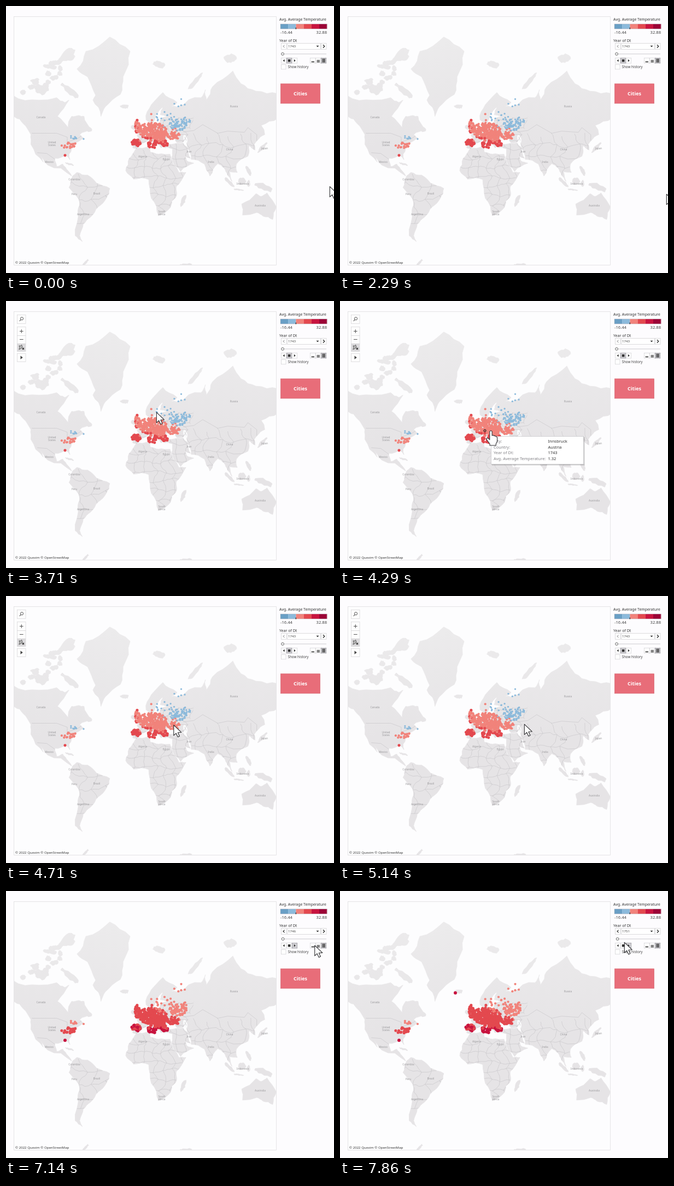
Recreate the animation shown at these times as an HTML page. Size 600 by 490 pixels, loop 8 s.

```html
<!DOCTYPE html>
<html lang="en">
<head>
<meta charset="utf-8">
<title>City temperatures</title>
<style>
html, body { margin: 0; width: 100%; height: 100%; overflow: hidden; background: #fdfcfe; }
svg { display: block; width: 600px; height: 490px; font-family: "Noto Sans", "Open Sans", sans-serif; }
</style>
</head>
<body>
<svg id="stage" viewBox="0 0 600 490" xmlns="http://www.w3.org/2000/svg">
  <defs>
    <clipPath id="mapClip"><rect x="15" y="20" width="479" height="455"/></clipPath>
    <linearGradient id="landFill" gradientUnits="userSpaceOnUse" x1="0" y1="60" x2="0" y2="260">
      <stop offset="0" stop-color="#ecebec"/><stop offset="1" stop-color="#e6e4e6"/>
    </linearGradient>
  </defs>
</svg>
<script>
const stage = document.getElementById('stage');

let seed = 1743;
const random = () => (seed = (seed * 16807) % 2147483647) / 2147483647;
const spread = size => (random() - .5) * size;

function el(tag, attrs = {}, parent = stage, content) {
  const node = document.createElementNS('http://www.w3.org/2000/svg', tag);
  for (const key in attrs) node.setAttribute(key, attrs[key]);
  if (content !== undefined) node.textContent = content;
  parent.appendChild(node);
  return node;
}
const group = (attrs, parent) => el('g', attrs, parent);
const path = (d, fill, parent, extra) => el('path', { d, fill, ...extra }, parent);
const box = (x, y, width, height, fill, stroke, parent, extra) =>
  el('rect', { x, y, width, height, fill, stroke, 'stroke-width': .7, ...extra }, parent);
const label = (x, y, size, content, fill = '#333', parent, extra) =>
  el('text', { x, y, 'font-size': size, fill, ...extra }, parent, content);

// ---- Base map: Mercator key points joined by seeded rough coasts ----
const project = (lon, lat) => [246.5 + 1.62 * lon, 325 - 93 * Math.asinh(Math.tan(lat * Math.PI / 180))];
const parse = text => text.split(', ').map(pair => project(...pair.split(' ').map(Number)));
const toPath = points => 'M' + points.map(p => p.map(v => v.toFixed(1)).join(' ')).join('L');

// Splits every edge and pushes its middle sideways.
function roughen(points, amount, closed, passes = 2) {
  if (!passes) return points;
  const result = [];
  points.forEach((a, i) => {
    result.push(a);
    if (!closed && i === points.length - 1) return;
    const b = points[(i + 1) % points.length], shift = spread(amount);
    result.push([(a[0] + b[0]) / 2 + (b[1] - a[1]) * shift, (a[1] + b[1]) / 2 - (b[0] - a[0]) * shift]);
  });
  return roughen(result, amount, closed, passes - 1);
}

const continents = {
  northAmerica: '-145 70, -115 68, -95 69, -86 67, -81 68, -94 60, -82 53, -78 60, -70 60.5, -64 60, -56 52, -69 48, -64 45, -74 40.5, -81 31, -80 25.5, -84 30, -97 27, -95 18.5, -88 21, -84 15.8, -78 8, -105 20, -114 31, -110 23, -124 40, -124 48, -137 58.5, -145 60.5',
  southAmerica: '-77 8, -72 12, -60 9, -50 0, -35 -6, -39 -17, -48 -26, -57 -36, -65 -42, -69 -51, -66 -55, -74 -51, -71 -30, -70 -18, -81 -5',
  greenland: '-45 60, -54 68, -51 70, -60 76, -72 78, -62 81.5, -35 83.6, -12 81.5, -20 76, -23 70.3, -40 65',
  africa: '-6 35.5, 10 37, 11 33, 20 31, 33 31, 43 12, 51 12, 40 -4, 40 -15, 35 -20, 32 -28, 20 -34.7, 12 -17, 9 4, -8 4.5, -17 14, -13 27',
  europe: '-9 37, -9 43, -1 44, -4 48, 8 54, 10 57, 11 54, 21 55, 23 59, 30 60, 60 60, 48 42, 41 41.5, 38 46, 29 45, 28 41, 23 37, 14 45, 18 40, 11 44, 0 40, -5 36',
  russia: '30 60, 22 61, 25 65, 17 61, 14 56, 6 58, 12 66, 25 71, 41 67, 34 65, 42 65, 68 69, 73 72, 74 68, 81 73, 104 77.5, 113 74, 130 71.5, 155 70.5, 155 59, 136 54.5, 140 48, 131 43, 118 49, 87 48, 48 46',
  asia: '48 48, 70 55, 87 49, 120 52, 133 47, 128 40, 129 35, 122 39, 121 29, 108 21, 109 12, 100 13, 103 2, 98 9, 94 17, 87 21.5, 78 8, 72 21, 57 26, 53 37',
  arabia: '53 37, 56 27, 49 30, 52 24.5, 60 22, 45 13, 35 28, 36 36, 27 37, 28 41, 41 41, 48 41',
  australia: '114 -23, 130 -12, 136 -15, 142.5 -11, 153 -26, 149 -38, 138 -35, 131 -31.5, 115 -34'
};

box(14.5, 19.5, 480, 456, '#fdfdfe', '#dfdee0', stage, { 'stroke-width': .8 });
const map = group({ 'clip-path': 'url(#mapClip)' });
const defs = stage.querySelector('defs');
const drawLand = points => path(toPath(points) + 'Z', 'url(#landFill)', map,
  { stroke: 'url(#landFill)', 'stroke-width': .8, 'stroke-linejoin': 'round' });

for (const name in continents) {
  const outline = roughen(parse(continents[name]), .22, true);
  drawLand(outline);
  path(toPath(outline) + 'Z', '#000', el('clipPath', { id: name }, defs));
}

function island(cx, cy, length, width, tilt = 0) {
  const turn = tilt * Math.PI / 180, points = [];
  for (let i = 0; i < 9; i++) {
    const angle = i * 2 * Math.PI / 9, r = .95 + spread(.4);
    const u = length * r * Math.cos(angle), v = width * r * Math.sin(angle);
    points.push([cx + u * Math.cos(turn) - v * Math.sin(turn), cy + u * Math.sin(turn) + v * Math.cos(turn)]);
  }
  drawLand(roughen(points, .4, true, 1));
}
island(217, 185, 8, 4);            // Iceland
island(241, 218, 10, 4, 75);       // Britain
island(233, 222, 4, 4);
island(324, 357, 11, 4, 110);      // Madagascar
island(470, 259, 14, 3, -50);      // Japan
island(409, 324, 14, 3, 45);       // Indonesia
island(425, 337, 10, 1.5, 8);
island(432, 322, 8, 7, -40);
island(444, 326, 3, 6);
island(471, 333, 18, 5, 20);
island(444, 303, 10, 3, 65);       // Philippines
island(153, 227, 5, 4);            // Newfoundland
island(116, 290, 9, 1.5, 18);      // Cuba
island(279, 107, 11, 7, 15);       // Svalbard
island(347, 138, 20, 4, -50);      // Novaya Zemlya
island(410, 97, 11, 9);
island(145, 471, 9, 2, -45);
island(330, 475, 12, 2);
island(118, 157, 22, 7, 40);       // Baffin
island(65, 153, 14, 9, 10);
island(113, 90, 17, 9, -35);
for (let i = 0; i < 16; i++) {
  island(103 - i * 3.6 + spread(38), 97 + i * 4 + spread(8), 4 + random() * 5, 2.5 + random() * 3, spread(70));
}
el('ellipse', { cx: 328, cy: 244, rx: 3.5, ry: 8, fill: '#fbfbfc', transform: 'rotate(-15 328 244)' }, map);

const borderStyle = { stroke: '#c5c3c6', 'stroke-width': .6, 'stroke-linejoin': 'round' };
const border = (points, clip) => path(toPath(points), 'none', clip, borderStyle);
['-123 49, -95 49, -83 46, -83 42, -71 45, -67 47', '-117 32.5, -106 31.7, -97 26',
 '48 50, 60 51, 70 55, 87 49, 98 50.5, 117 49.7, 121 53, 131 48, 131 43'
].forEach(line => border(parse(line), map));

// Countries as a jittered brick lattice, cut off at the coast.
function countries(name, left, top, right, bottom, cell) {
  const clip = group({ 'clip-path': `url(#${name})` }, map);
  const corner = (row, col) => [left + (col + row % 2 * .5) * cell + spread(cell * .5), top + row * cell + spread(cell * .5)];
  const rows = Math.ceil((bottom - top) / cell), cols = Math.ceil((right - left) / cell);
  let above;
  for (let row = 0; row <= rows; row++) {
    const line = Array.from({ length: cols + 1 }, (_, col) => corner(row, col));
    if (row) border(roughen(line, .3), clip);
    if (above) line.forEach((point, col) => border(roughen([above[col], point], .3), clip));
    above = line;
  }
}
countries('africa', 215, 262, 330, 385, 17);
countries('southAmerica', 112, 304, 195, 395, 24);
countries('asia', 322, 236, 440, 320, 21);
countries('arabia', 290, 244, 345, 310, 17);
countries('europe', 232, 195, 330, 260, 13);

[['Canada', 64, 206], ['United', 84, 252], ['States', 84, 257], ['Mexico', 79, 288], ['Colombia', 125, 320],
 ['Brazil', 166, 346], ['Peru', 125, 347], ['Argentina', 141, 384], ['Algeria', 250, 278], ['Egypt', 293, 283],
 ['South', 285, 379], ['Africa', 285, 384], ['Russia', 417, 186], ['China', 409, 265], ['India', 375, 288],
 ['Iran', 335, 269], ['Japan', 473, 263], ['Indonesia', 433, 328], ['Australia', 465, 368]
].forEach(([name, x, y]) => label(x, y, 4.8, name, '#99989b', map, { 'text-anchor': 'middle' }));
label(17, 472.5, 6.1, '© 2022 Quovim © OpenStreetMap', '#333');

// ---- City marks ----
const palette = ['#6a9fc5', '#8cbadb', '#f1837b', '#e3494f', '#c8143f', '#9b0436'];
const coldest = -16.44, binSize = 8.22;
const cities = [];

function cluster(cx, cy, rx, ry, count, since = 1743) {
  while (count--) {
    const angle = random() * 2 * Math.PI, r = Math.sqrt(random());
    const x = cx + rx * r * Math.cos(angle), y = cy + ry * r * Math.sin(angle);
    const node = el('circle', { cx: x.toFixed(1), cy: y.toFixed(1) }, map);
    cities.push({ x, y, since, noise: spread(3), node });
  }
}
cluster(284, 203, 25, 10, 18);     // Nordic countries
cluster(311, 180, 24, 13, 5);
cluster(315, 218, 16, 11, 75);     // Russia
cluster(331, 211, 9, 7, 14);
cluster(305, 238, 14, 7, 45);      // Ukraine
cluster(240, 222, 5, 13, 32);      // Britain
cluster(268, 229, 26, 15, 270);    // Central Europe
cluster(284, 242, 13, 10, 75);     // Balkans
cluster(238, 251, 8, 6, 34);       // Iberia
cluster(268, 253, 8, 8, 22);       // Italy
cluster(290, 253, 6, 5, 12);
cluster(122, 242, 9, 4, 8);        // Eastern America
cluster(114, 254, 13, 8, 20);
cluster(142, 244, 0, 0, 1);
cluster(108, 274, 0, 0, 1);
cluster(211, 187, 0, 0, 1, 1750);  // Iceland

// Colder to the north and, more strongly in the north, to the east.
function temperature({ x, y, noise }, year) {
  const season = year === 1743 || year === 1745 ? 0 : 6.5;
  if (x < 200) return season + 2 + .34 * (y - 250);
  const south = y - 230, east = x - 265;
  const mean = 5 + .12 * south + .2 * Math.max(0, south - 10) - east * (.1 - .004 * south);
  return season + Math.max(-4.5, mean + noise);
}
let shownYear;
function paintCities(year) {
  if (year === shownYear) return;
  shownYear = year;
  cities.forEach(city => {
    const bin = Math.floor((temperature(city, year) - coldest) / binSize);
    const missing = year < city.since || (year > 1745 && city.x > 330);
    city.node.setAttribute('r', missing ? 0 : 1.2 + bin * .45);
    city.node.setAttribute('fill', palette[bin]);
  });
}

// ---- Side panel ----
label(500, 27, 6.9, 'Avg. Average Temperature', '#333', stage, { 'font-weight': 500 });
palette.forEach((color, i) => box(502 + i * 14.2, 33, 14.3, 9, color, 'none'));
box(502, 33, 85, 9, 'none', '#b9b4ba', stage, { 'stroke-width': .5 });
path('M530.3 39.5V42.5', 'none', stage, { stroke: '#222', 'stroke-width': 1.2 });
label(502, 50.5, 7.6, '-16.44', '#444');
label(587, 50.5, 7.6, '32.88', '#444', stage, { 'text-anchor': 'end' });
label(500, 65.5, 7, 'Year of Dt', '#333', stage, { 'font-weight': 500 });

box(503.5, 68.5, 9.5, 11, '#fff', '#cfced1');
box(514.5, 68.5, 61, 11, '#fff', '#cfced1');
box(576.5, 68.5, 9.5, 11, '#fff', '#cfced1');
const backArrow = path('M509.6 71.6L507 74L509.6 76.4', 'none', stage, { 'stroke-width': 1.1 });
path('M580 71.3L582.8 74L580 76.7', 'none', stage, { stroke: '#222', 'stroke-width': 1.2 });
path('M567.5 72.8H572.5L570 75.6Z', '#333');
const yearText = label(516, 76.4, 6.1, '', '#444');

path('M506 88H586', 'none', stage, { stroke: '#cccbce', 'stroke-width': 1 });
const knob = el('circle', { cy: 88, r: 2.4, fill: '#fff', stroke: '#555', 'stroke-width': .9 });

const buttonRow = left => [0, 1, 2].map(i => box(left + i * 9.9, 95.5, 9.4, 9.5));
const [backButton, stopButton, playButton] = buttonRow(503.5);
const [slowButton, mediumButton, fastButton] = buttonRow(556.6);
path('M509.6 97.8V102.6L506.6 100.2ZM515.8 97.9H520.4V102.5H515.8ZM526.8 97.8V102.6L529.8 100.2Z', '#333');
path('M558.6 102.5H564M568.5 99.8H574M568.5 102.5H574M578.3 97.6H584M578.3 100H584M578.3 102.5H584', 'none', stage,
  { stroke: '#222', 'stroke-width': 1.3 });
function press(node, on) {
  node.setAttribute('fill', on ? '#d3d2d6' : '#fff');
  node.setAttribute('stroke', on ? '#8d8c92' : '#d2d1d4');
}
press(backButton, false);
press(slowButton, false);
press(fastButton, true);
box(503.5, 107.5, 8.5, 8.5, '#fff', '#cfced1');
label(515.5, 114.3, 6.3, 'Show history', '#444');
box(502.5, 142.8, 72, 36, '#e86d79', '#d5626e');
label(538.5, 164.3, 9, 'Cities', '#fff', stage, { 'font-weight': 700, 'text-anchor': 'middle' });

// ---- Map toolbar ----
const toolbar = group();
const tool = (y, height, fill = '#fdfdfd') => box(20.5, y, 15.5, height, fill, '#d4d3d6', toolbar);
tool(25.5, 16);
tool(47.5, 16);
tool(63.5, 15);
tool(78.5, 14, '#dcdbdd');
tool(96.5, 15);
el('circle', { cx: 29, cy: 32.3, r: 2.6, fill: 'none', stroke: '#555', 'stroke-width': 1 }, toolbar);
path('M27 34.3L24.8 36.8M25 55.5H31.6M28.3 52.2V58.8M25 70.5H31.6', 'none', toolbar, { stroke: '#555', 'stroke-width': 1.1 });
path('M24 82L27 82.6L28.5 80.5L30 84L28 87L23.8 89L25 85.5Z', '#bbb', toolbar, { stroke: '#333', 'stroke-width': .7 });
path('M29.8 86L33 89.2M33 86L29.8 89.2', 'none', toolbar, { stroke: '#222', 'stroke-width': 1.1 });
path('M26.5 100.6V107L30.8 103.8Z', '#444', toolbar);

// ---- Tooltip ----
const tooltip = group();
[2, 1].forEach(d => box(276 + d, 248 + d, 170, 52, '#000', 'none', tooltip, { opacity: .1 }));
box(276.5, 248.5, 169, 51, '#fff', '#c4c3c6', tooltip);
[['City:', 'Innsbruck'], ['Country:', 'Austria'], ['Year of Dt:', '1743'], ['Avg. Average Temperature:', '1.32']]
  .forEach(([key, value], i) => {
    const y = 260.3 + i * 10.5;
    label(281, y, 7.5, key, '#818085', tooltip);
    label(380.5, y, 7.5, value, '#333', tooltip, { 'font-weight': 500 });
  });
const hoverRing = el('circle', { cx: 265, cy: 238, r: 2.2, fill: '#c9605c', stroke: '#222', 'stroke-width': 1 });

// ---- Pointer ----
const outline = { stroke: '#2b2b2e', 'stroke-width': 1.1, 'stroke-linejoin': 'round' };
const arrow = path('M.3 .3V19.4L4.7 15.4L7.9 22.2L11 20.8L7.9 14.2L14.4 13.8Z', '#fff', stage, outline);
const hand = path('M-2.2 1.5Q0 -1.5 2.2 1.5V9Q4.5 7.2 6 9.8Q8.3 8.4 9.2 11Q11.6 10.6 11.6 13V18.5Q11 22 9.3 24V27H-2V24Q-5.5 20 -8 15.8Q-8 12.8 -5.2 13.6L-2.2 16.6Z',
  '#fff', stage, outline);

// Resting points of the pointer: arrives at step, leaves at step, x, y
const stops = [[0, 15, 592, 331], [16, 16, 597, 345], [22, 24, 274, 170], [28, 30, 276, 238], [36, 36, 337, 235],
  [41, 44, 526, 98], [46, 49, 568, 100], [55, 56, 520, 94]];
function pointerAt(step) {
  const i = stops.findIndex(([, leaves]) => leaves >= step);
  const [arrives, , x, y] = stops[i];
  if (step >= arrives) return [x, y];
  const [, left, fromX, fromY] = stops[i - 1];
  const k = (step - left) / (arrives - left), ease = k * k * (3 - 2 * k);
  return [fromX + (x - fromX) * ease, fromY + (y - fromY) * ease];
}

const show = (node, on) => node.setAttribute('visibility', on ? 'visible' : 'hidden');
const LOOP = 8000, STEPS = 56;

function render(time) {
  const step = Math.floor(((time + 4) % LOOP) / (LOOP / STEPS));
  const [x, y] = pointerAt(step);
  const year = step < 44 ? 1743 : 1744 + Math.max(0, step - 48);
  const playing = step >= 42, hovering = step >= 28 && step <= 31;

  paintCities(year);
  yearText.textContent = year;
  knob.setAttribute('cx', 506 + (year - 1743) * .2);
  backArrow.setAttribute('stroke', year > 1743 ? '#222' : '#a9a8ac');
  press(stopButton, !playing);
  press(playButton, playing);
  press(mediumButton, x > 566 && x < 576 && y < 105);

  show(toolbar, step >= 18 && x < 495);
  show(tooltip, hovering);
  show(hoverRing, hovering);
  show(hand, hovering);
  show(arrow, !hovering);
  tooltip.setAttribute('transform', `translate(${x - 276} ${y - 238})`);
  [arrow, hand].forEach(node => node.setAttribute('transform', `translate(${x} ${y})`));
}

const start = performance.now();
function tick(now) {
  render(Math.max(0, now - start));
  requestAnimationFrame(tick);
}
render(0);
requestAnimationFrame(tick);
</script>
</body>
</html>
```
